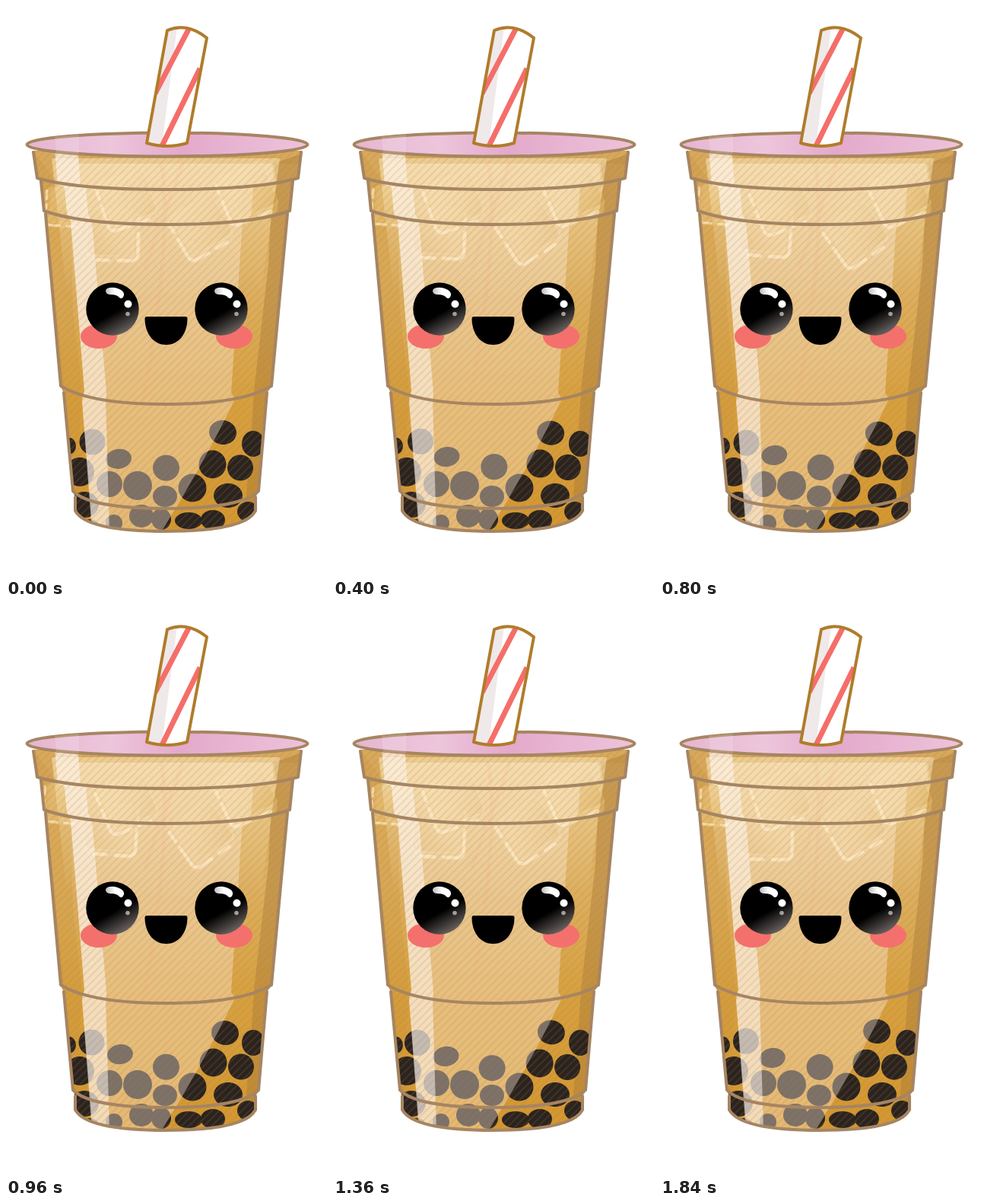
These frames come from a looping animation (422x750 px, 1.92 s). An HTML page:

```html
<!DOCTYPE html>
<html lang="en">
<head>
<meta charset="utf-8">
<title>Bubble tea</title>
<style>
html, body { margin: 0; width: 100%; height: 100%; overflow: hidden; background: #fff; }
svg { display: block; width: 422px; height: 750px; }
</style>
</head>
<body>
<svg viewBox="0 0 422 750">
  <defs>
    <clipPath id="cup"><path d="M36 190L41 227 46 230 50 269 52 273 72 500 76 508 88 638 91 645V664Q100 690 210 690T328 664V645L332 638 343 508 349 500 370 273 373 269 377 230 384 227 388 190Z"/></clipPath>
    <clipPath id="tube"><path id="tubeShape" d="M212 32Q238 21 264 42L238 180Q212 188 185 180Z"/></clipPath>
    <linearGradient id="tea" x2="0" y2="1">
      <stop stop-color="#e0b366"/><stop offset=".35" stop-color="#ddb062"/>
      <stop offset=".65" stop-color="#d7a03f"/><stop offset="1" stop-color="#d3962f"/>
    </linearGradient>
    <linearGradient id="foam" x2="0" y2="1">
      <stop stop-color="#fff0cc" stop-opacity=".5"/><stop offset="1" stop-color="#fff0cc" stop-opacity="0"/>
    </linearGradient>
    <linearGradient id="lid">
      <stop stop-color="#e6b5d0"/><stop offset=".3" stop-color="#edc6dc"/>
      <stop offset=".55" stop-color="#e3a9cb"/><stop offset="1" stop-color="#eec3da"/>
    </linearGradient>
    <linearGradient id="ice" x1="0" y1=".2" x2="1" y2=".7">
      <stop stop-color="#e8c27b" stop-opacity=".25"/><stop offset="1" stop-color="#cf973a" stop-opacity=".6"/>
    </linearGradient>
    <linearGradient id="iris" x1=".3" y1=".25" x2=".72" y2="1">
      <stop offset=".45"/><stop offset="1" stop-color="#736b68"/>
    </linearGradient>
    <linearGradient id="shine"><stop stop-color="#fff" stop-opacity=".75"/><stop offset=".5" stop-color="#fff"/></linearGradient>
    <pattern id="hatch" width="7" height="7" patternUnits="userSpaceOnUse" patternTransform="rotate(45)">
      <path d="M3 0V7" stroke="#b07a35" stroke-width="1.4" opacity=".25"/>
    </pattern>
    <g id="cube">
      <path d="M-40-24L-28-32H24Q32-32 32-24V28L24 40H-30Q-40 40-40 30Z" fill="#f0d08d" opacity=".4"/>
      <rect x="-29" y="-31" width="60" height="60" rx="7" fill="url(#ice)"/>
      <g fill="none" stroke-linecap="round">
        <path d="M-36-24V28Q-36 36-28 36H24" stroke="#d9a957" stroke-width="9" opacity=".45"/>
        <path d="M-36-24V-10M-36 0V26Q-36 36-26 36H-10M2 36H18" stroke="#fbe6b8" stroke-width="4.5" opacity=".75"/>
      </g>
    </g>
    <g id="eye">
      <circle r="34.7" fill="url(#iris)"/>
      <path d="M-9-24Q-8-29 3-28 16-25 15-18 13-12 9-15 6-19-2-19-9-19-9-24Z" fill="url(#shine)"/>
      <circle cx="20.5" cy="-6.5" r="5" fill="#fff"/>
      <circle cx="20" cy="6.5" r="2.8" fill="#a39d99"/>
    </g>
  </defs>

  <g clip-path="url(#cup)">
    <path d="M30 180H400V700H30Z" fill="url(#tea)"/>
    <path d="M36 190L68 234 85 282 88 400 100 508 95 580 102 690H60Z" fill="#c88f35" opacity=".25"/>
    <path d="M36 190H388V207H62L66 234 54 276 76 500 82 638H60Z" fill="#b98639" opacity=".22"/>
    <path d="M352 207L356 234 348 276 345 340 326 505 322 570 312 690H345L400 190Z" fill="#a87b38" opacity=".45"/>
    <g id="pearls" fill="#2a231f"></g>
    <g id="cubes"></g>
    <path d="M65 190L95 196V207H350L353 234 325 238 322 276 311 282 296 508 301 516Q265 592 204 691H114L100 518 103 505 85 282 80 272 77 238 68 234Z" fill="#fff0e2" opacity=".38"/>
    <path d="M60 200H360L335 380H80Z" fill="url(#foam)"/>
    <path d="M233 205L182 345M204 205Q220 300 180 520" fill="none" stroke="#f3a58c" stroke-width="5" opacity=".13"/>
    <path d="M64 190L95 196 98 236 105 238 108 274 113 282 132 508 131 518 136 691H113L100 518 103 505 85 282 80 272 77 238 68 234Z" fill="#fff8f2" opacity=".55"/>
    <path d="M30 180H400V700H30Z" fill="url(#hatch)"/>
  </g>

  <g fill="none" stroke="#a68562" stroke-width="4" stroke-linecap="round" stroke-linejoin="round">
    <path d="M36 192L41 226Q90 241 212 241T384 226L388 192"/>
    <path d="M46 230L50 269Q100 287 212 287T373 269L377 230"/>
    <path d="M52 273L72 499Q110 523 210 523T349 499L370 273"/>
    <path d="M76 508L88 637Q110 660 210 660T332 637L343 508"/>
    <path d="M91 645V663Q106 690 210 690T328 663V645"/>
    <ellipse cx="212" cy="182" rx="184.5" ry="15.5" fill="url(#lid)"/>
  </g>
  <path d="M64 172L96 169 96 195 66 193Z" fill="#fff" opacity=".15"/>

  <g clip-path="url(#tube)">
    <path d="M180 20H270V190H180Z" fill="#fff"/>
    <path d="M208 20H226L204 190H180Z" fill="#f0e9e9"/>
    <path d="M243 25L196 115M255 82L203 188" stroke="#f56e69" stroke-width="7"/>
  </g>
  <use href="#tubeShape" fill="none" stroke="#b07c2b" stroke-width="4" stroke-linejoin="round"/>

  <g fill="#f4706c">
    <ellipse cx="122" cy="434" rx="24" ry="16"/>
    <ellipse cx="300" cy="434" rx="24" ry="16"/>
  </g>
  <use href="#eye" x="140" y="398"/>
  <use href="#eye" x="283" y="398"/>
  <path d="M185 408H236Q238.5 408 238.5 411C238 432 226 445 210.5 445S183 432 182.500 411Q182.500 408 185 408Z"/>
</svg>

<script>
const LOOP = 1920, STEP = 80;
const $ = id => document.getElementById(id);

function add(parent, tag, attrs) {
  const node = document.createElementNS("http://www.w3.org/2000/svg", tag);
  for (const key in attrs) node.setAttribute(key, attrs[key]);
  return parent.appendChild(node);
}

// x, y, rx, ry
const still = [
  [83, 578, 9, 11], [97, 612, 19, 19], [136, 628, 17, 17], [173, 630, 19, 19],
  [209, 644, 16, 14], [245, 633, 18.5, 18.5], [325, 575, 15, 17], [292, 643, 19, 16],
  [318, 664, 14, 13], [178, 670, 16, 15], [142, 679, 11, 11], [103, 655, 19, 17],
  [204, 674, 13, 14], [240, 676, 18, 11], [272, 675, 16, 13], [110, 683, 12, 9]
];
// x, y, rx, ry, tilt, then sine and cosine reach for x and y
const drifting = [
  [113, 573.5, 17, 17, 0, 2, 0.5, -1.3, -1],
  [149, 592.5, 17, 13, -8, 0.8, -1, -1, 2.300],
  [210.5, 606.7, 17.5, 17, 0, 1.4, 0, -1.5, 0],
  [272, 601.5, 18, 18.5, 0, 0.5, -0.5, -0.6, 0.5],
  [286.5, 561, 18, 16, 10, 0, -1.500, 0, -1],
  [308.5, 606.5, 17, 17, 0, 0.5, -0.5, -0.5, 0]
];
// x, y, tilt, mirror and size, then travel in x, y and tilt
const ice = [
  [80, 262, 3, .75, -3, -3, 2],
  [138, 298, 1, -1, -2, -6, 3],
  [318, 243, -22, 1, -2, 3, -3],
  [160, 252, -18, 1, 0, 5, -4],
  [257, 288, -30, 1, 1, 10, -5]
];

for (const [cx, cy, rx, ry] of still) add($("pearls"), "ellipse", { cx, cy, rx, ry });
const pearls = drifting.map(([, , rx, ry]) => add($("pearls"), "ellipse", { rx, ry }));
const cubes = ice.map(() => add($("cubes"), "use", { href: "#cube" }));

function draw(time) {
  const now = Math.floor(time % LOOP / STEP) * STEP;
  const angle = now / LOOP * 2 * Math.PI;
  const sin = Math.sin(angle), cos = Math.cos(angle);
  const lift = (1 - Math.cos(angle + 0.2)) / 2;

  drifting.forEach(([x, y, , , tilt, sx, cx, sy, cy], i) => {
    pearls[i].setAttribute("transform",
      `translate(${x + sx * sin + cx * cos} ${y + sy * sin + cy * cos}) rotate(${tilt})`);
  });
  ice.forEach(([x, y, tilt, size, dx, dy, turn], i) => {
    cubes[i].setAttribute("transform",
      `translate(${x + dx * lift} ${y + dy * lift}) rotate(${tilt + turn * lift}) scale(${size} ${Math.abs(size)})`);
  });
}

const start = performance.now();
function tick() {
  draw(performance.now() - start);
  requestAnimationFrame(tick);
}
tick();
</script>
</body>
</html>
```
